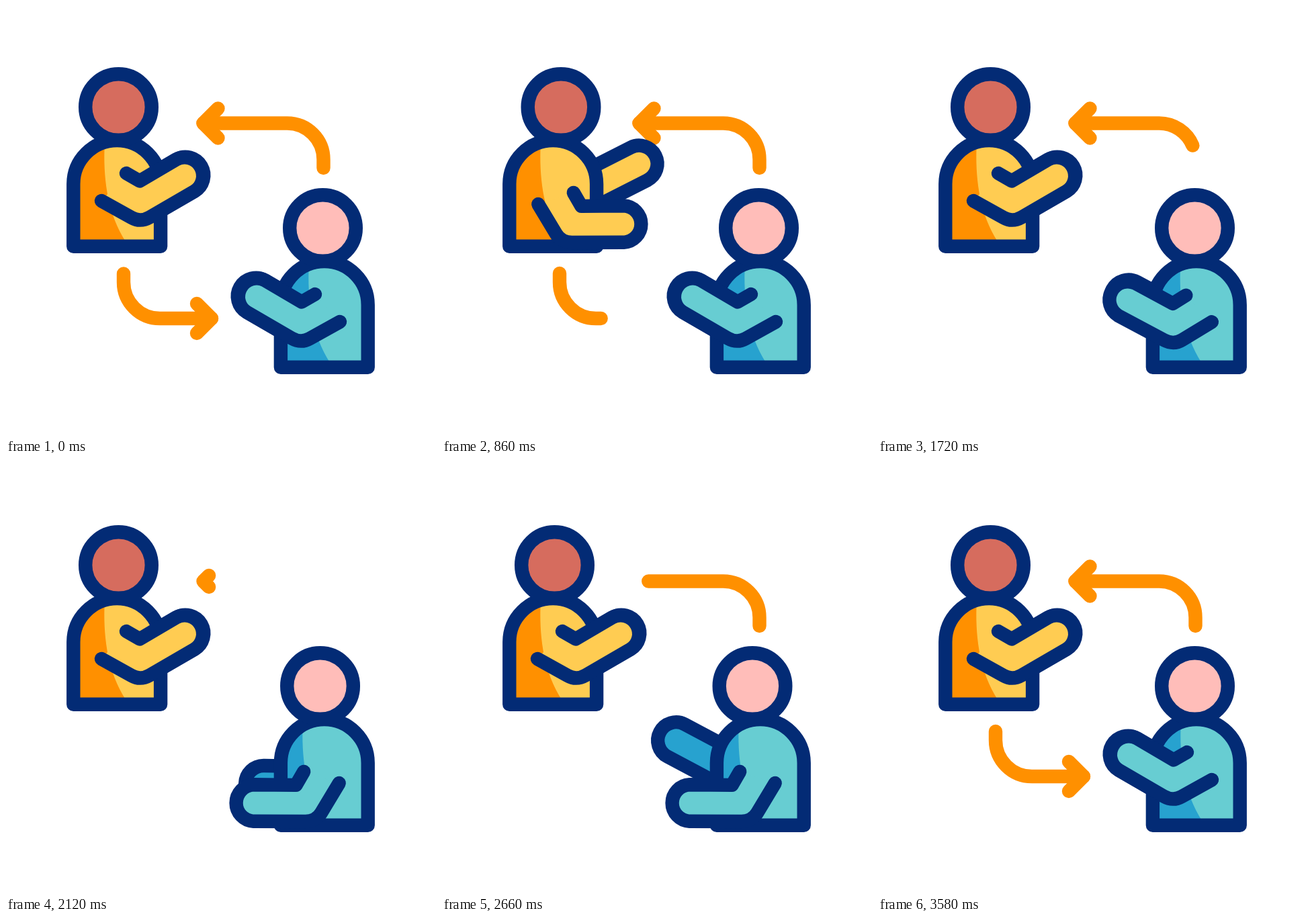
These frames come from a looping animation (640x640 px, 3.6 s). An HTML page with a canvas:

```html
<!DOCTYPE html>
<html lang="en">
<head>
<meta charset="utf-8">
<title>Two people talking</title>
<style>
  html, body { margin: 0; width: 100%; height: 100%; overflow: hidden; background: #fff; }
  canvas { display: block; width: 640px; height: 640px; }
</style>
</head>
<body>
<canvas id="stage" width="640" height="640"></canvas>
<script>
const ctx = document.getElementById('stage').getContext('2d');
const LOOP = 3600, SECOND_START = 1660, LINE = 20.4;
const NAVY = '#032b75', ORANGE = '#ff9000';
const LEFT = { skin: '#d66c5e', front: '#ffcc52', shade: ORANGE, farArm: '#ffcc52', start: 0 };
const RIGHT = { skin: '#ffbdb9', front: '#67cdd2', shade: '#27a2cf', farArm: '#27a2cf',
                start: SECOND_START, mirror: true };

// Each key: time, then the values reached at that time.
const HEAD = [[350, 0], [600, 9.5], [1150, 9.5], [1350, 0]];
const NEAR_ARM = [[0, 0], [380, 30], [1390, 30], [1630, 0]];
const FAR_ARM = [
  [0, 267, 252, -30], [420, 252, 301, 1], [660, 298, 241, -25], [1000, 290.5, 231.5, -28],
  [1220, 303.4, 256, -17.5], [1380, 276.5, 252.5, -21], [1620, 267, 252, -30]
];

const clamp = v => Math.max(0, Math.min(1, v));
const smooth = v => v * v * (3 - 2 * v);
const rad = deg => deg * Math.PI / 180;

function sample(keys, t) {
  if (t <= keys[0][0]) return keys[0].slice(1);
  for (let i = 1; i < keys.length; i++) {
    const a = keys[i - 1], b = keys[i];
    if (t <= b[0]) {
      const k = smooth((t - a[0]) / (b[0] - a[0]));
      return a.slice(1).map((v, j) => v + (b[j + 1] - v) * k);
    }
  }
  return keys[keys.length - 1].slice(1);
}

function paint(path, fill) {
  if (fill) { ctx.fillStyle = fill; ctx.fill(path); }
  ctx.strokeStyle = NAVY;
  ctx.stroke(path);
}

const body = new Path2D('M100.3 357.8V265A64.9 64.9 0 0 1 230.1 265V357.8Z');
const nearArm = new Path2D('M142 290L187 315Q200 322.4 214 314.4L280.7 275.6' +
  'A27.3 27.3 0 0 0 253.4 228.4L199 260.5L179 249');
const farArm = new Path2D('M-90 -27.3H0A27.3 27.3 0 0 1 0 27.3H-90Z');

function shadeBody(person, shift) {
  const x = v => person.mirror ? 335 - v + shift : v;
  ctx.save();
  ctx.clip(body);
  ctx.beginPath();
  ctx.moveTo(x(30), 190);
  ctx.lineTo(x(147), 190);
  ctx.lineTo(x(147), 200);
  ctx.bezierCurveTo(x(144), 255, x(150), 312, x(183), 358);
  ctx.lineTo(x(30), 358);
  ctx.fillStyle = person.shade;
  ctx.fill();
  ctx.restore();
}

function drawPerson(person, time) {
  const t = time - person.start;
  const [lean] = sample(HEAD, t);
  const [bend] = sample(NEAR_ARM, t);
  const [handX, handY, tilt] = sample(FAR_ARM, t);

  ctx.save();
  if (person.mirror) ctx.transform(-1, 0, 0, 1, 639, 180);

  ctx.save();
  ctx.translate(handX, handY);
  ctx.rotate(rad(tilt));
  paint(farArm, person.farArm);
  ctx.restore();

  ctx.fillStyle = person.front;
  ctx.fill(body);
  shadeBody(person, bend * 0.3);
  paint(body);

  const head = new Path2D();
  head.arc(167.5 + lean, 150.5, 49.3, 0, Math.PI * 2);
  paint(head, person.skin);

  ctx.translate(133.4, 294.8);
  ctx.rotate(rad(bend));
  ctx.translate(-133.4, -294.8);
  paint(nearArm, person.front);
  ctx.restore();
}

const arrows = [
  { x: 175, y: 398, tipX: 306, tipY: 465, erase: [0, 1154], draw: [620, 2766] },
  { x: 472.5, y: 241, tipX: 293.5, tipY: 174.5, erase: [SECOND_START], draw: [2286] }
];
const CORNER = 54, LINE_TIME = 400, HEAD_TIME = 100, WING = 22;

function drawArrow({ x, y, tipX, tipY, erase, draw }, t) {
  let from = 0, to = 1, wing = 1;
  erase.forEach((start, i) => {
    if (t >= draw[i]) {
      from = 0;
      to = clamp((t - draw[i]) / LINE_TIME);
      wing = clamp((t - draw[i] - LINE_TIME) / HEAD_TIME);
    } else if (t >= start) {
      from = clamp((t - start) / LINE_TIME);
      to = 1;
      wing = 1 - clamp((t - start - LINE_TIME) / HEAD_TIME);
    }
  });

  ctx.strokeStyle = ORANGE;
  if (to > from) {
    const length = Math.abs(tipY - y) + Math.abs(tipX - x) - CORNER * (2 - Math.PI / 2);
    ctx.setLineDash([(to - from) * length + (to === 1 ? 1 : 0), 9999]);
    ctx.lineDashOffset = -from * length;
    ctx.beginPath();
    ctx.moveTo(x, y);
    ctx.arcTo(x, tipY, tipX, tipY, CORNER);
    ctx.lineTo(tipX, tipY);
    ctx.stroke();
    ctx.setLineDash([]);
  }
  if (wing > 0) {
    const size = WING * wing, backX = tipX - Math.sign(tipX - x) * size;
    ctx.beginPath();
    ctx.moveTo(backX, tipY - size);
    ctx.lineTo(tipX, tipY);
    ctx.lineTo(backX, tipY + size);
    ctx.stroke();
  }
}

function render(t) {
  ctx.fillStyle = '#fff';
  ctx.fillRect(0, 0, 640, 640);
  ctx.lineWidth = LINE;
  ctx.lineCap = ctx.lineJoin = 'round';
  arrows.forEach(arrow => drawArrow(arrow, t));
  drawPerson(LEFT, t);
  drawPerson(RIGHT, t);
}

const begin = performance.now();
function tick() {
  render((performance.now() - begin) % LOOP);
  requestAnimationFrame(tick);
}
tick();
</script>
</body>
</html>
```
